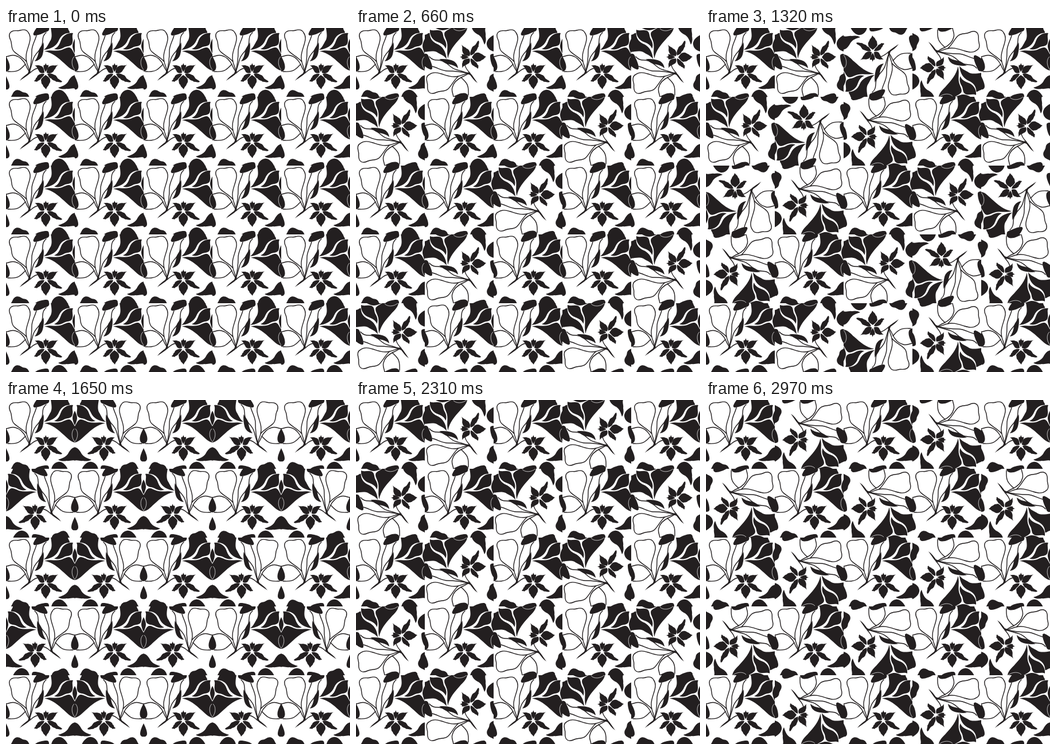
An HTML page for the animation above (3.3 s loop, 600 by 600 pixels).

```html
<!DOCTYPE html>
<html lang="en">
<head>
<meta charset="utf-8">
<title>Floral tiles</title>
<style>
  html, body { margin: 0; width: 100%; height: 100%; overflow: hidden; background: #fff; }
  svg { display: block; width: 100vw; height: 100vh; }
</style>
</head>
<body>
<svg id="stage" viewBox="0 0 600 600" xmlns="http://www.w3.org/2000/svg">
  <defs>
    <clipPath id="cell"><rect width="120" height="120"/></clipPath>
    <g id="tile" clip-path="url(#cell)" fill="#231f20">
      <!-- large bloom -->
      <path d="M66 38C72 34 74 27 78 21C81 15 79 6 78 -1H108C108 4 112 6 111 8.500C100 9 95 15 92 22C88 31 79 37 66 38Z"/>
      <path d="M84 36.500C93 33 94 25 97 19C101 12 109 8 117 9C114 15 118 20 115.500 27C113 33 106 31 101 34C95 37.500 90 38.500 84 36.500Z"/>
      <path d="M67 40.500C78 37.500 87 41 96 38.500C104 36 107 33 112 34.500C116 37 117 42 121 47V74C113 74 107 66 101 61C91 52 81 43 67 40.500Z"/>
      <path d="M121 17C117 24 115 30 116.500 35C117.500 39 119 43 121 46Z"/>
      <path d="M120 73C114 66 113.500 55 119 50" fill="none" stroke="#fff" stroke-width=".7"/>
      <!-- edge pieces -->
      <path d="M-1 49H0C3 55 7 62 6.500 69C6 73 4 76 -1 76Z"/>
      <path d="M-1 82C2 88 6 96 6 102C6 106 3 108 -1 107Z"/>
      <path d="M91 104C97 102 104 100 108 94C111 88 115 83 121 82V106C115 104 111 107 106 106C101 107 95 107 91 104Z"/>
      <path d="M8 121C11 118 12 110 18 108.500C24 107 27 112 32 112.500C37 113 39 116 41 121Z"/>
      <path d="M79 121C80 115 84 109 91 108C97 107 104 112 108 121Z"/>
      <path d="M50 121C53 117 63 114 71 114C75 114 75 118 75 121Z"/>
      <!-- bud and side leaf -->
      <path d="M48 9C50 4 52 2 54 -1H75C76 2 75 5 72 6C64 9 58 13 50 13C48 13 47 11 48 9Z"/>
      <path d="M65.500 25C62 32 58 34 57 41C56 48 54 53 50 58C57 57 62 53 64 46C65.500 40 66.500 33 65.500 25Z"/>
      <!-- open petals and stems -->
      <g fill="none" stroke="#231f20" stroke-width="1.400" stroke-linecap="round">
        <path d="M36 59C30 51 21 48 14 41C8 35 11 27 8 21C5 15 5 9 10 6C16 3 20 6 25 4C32 2 37 4 39 8C44 15 42 22 40 29C37 39 33 48 36 59C37 65 40 69 41 76"/>
        <path d="M0 50C7 49 10 46 16 48C25 50 31 57 35 66C37 71 39 73 41 77"/>
        <path d="M3 76C11 76 17 77 23 73C28 70 31 66 34 63"/>
        <path d="M53 13C51 22 45 30 45 40C45 52 44 62 41 75"/>
        <path d="M70 8C61 15 66 24 62 32C58 42 50 44 47 56C45 64 43 70 41 76"/>
        <path d="M56 70C49 71 46 75 41 79"/>
      </g>
      <path d="M40 74L43 75C42 79 40 81 37 83C33 86 28 89 24 92C28 86 34 82 38 79Z"/>
      <!-- small blossom -->
      <path d="M67 78C62 80 58 78 57 74C55 72 55 68 50 65C54 66 57 64 60 66C64 66 67 71 67 78Z"/>
      <path d="M69 77C68 73 64 70 66 64C67 66 68 65 69.500 61C70 65 72 66 74 64C75 69 71 73 69 77Z"/>
      <path d="M71 78C71 71 74 67 78 66C82 64 85 67 91 64C86 68 87 71 84 73C83 77 77 81 71 78Z"/>
      <path d="M72 80C78 78 82 81 85 82C89 83 89 88 92 89C94 91 97 91 98 94C94 96 91 93 88 94C85 91 81 92 79 88C75 87 74 84 72 80Z"/>
      <path d="M69 82C73 85 77 87 77 91C78 94 76 96 75 98C74 102 72 101 70 107C67 103 65 103 64 99C61 97 62 94 61 91C62 87 66 85 69 82Z"/>
      <path d="M67 80C66 84 63 86 61 88C59 92 56 91 54 94C52 92 51 95 49 92C53 90 51 87 54 86C54 82 61 79 67 80Z"/>
    </g>
  </defs>
</svg>
<script>
  const SIZE = 120, COUNT = 5, STEP = 330;
  const stage = document.getElementById('stage');

  // Each turn maps the tile onto itself.
  const turns = {
    N: '',
    R: 'rotate(90 60 60)',
    U: 'rotate(180 60 60)',
    L: 'rotate(-90 60 60)',
    H: 'matrix(-1 0 0 1 120 0)',
    V: 'matrix(1 0 0 -1 0 120)'
  };

  // Turns repeated along the diagonals, one layout per step.
  const layouts = ['N', 'NRN', 'NLN', 'NURL', 'NLUR', 'NH', 'NV', 'NL', 'NU', 'NR'];

  const tiles = [];
  for (let row = 0; row < COUNT; row++) {
    for (let col = 0; col < COUNT; col++) {
      const el = document.createElementNS(stage.namespaceURI, 'use');
      el.setAttribute('href', '#tile');
      stage.append(el);
      tiles.push({ el, row, col });
    }
  }

  let shown = -1;
  function draw(time) {
    const step = Math.floor(time / STEP) % layouts.length;
    if (step === shown) return;
    shown = step;
    const layout = layouts[step];
    for (const { el, row, col } of tiles) {
      const turn = turns[layout[(row + col) % layout.length]];
      el.setAttribute('transform', `translate(${col * SIZE} ${row * SIZE}) ${turn}`);
    }
  }

  const start = performance.now();
  function tick() {
    draw(performance.now() - start);
    requestAnimationFrame(tick);
  }
  tick();
</script>
</body>
</html>
```
